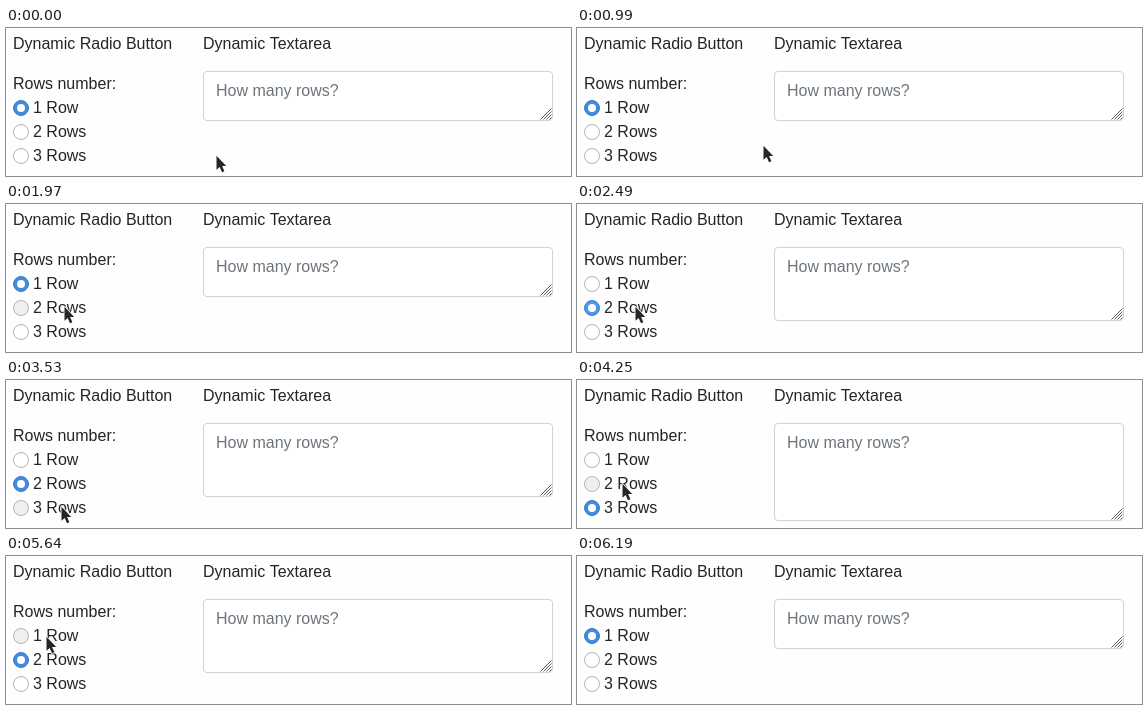
Recreate the animation shown at these times as an HTML page with a canvas. Size 565 by 148 pixels, loop 7100 ms.

```html
<!DOCTYPE html>
<html lang="en">
<head>
<meta charset="utf-8">
<title>Dynamic textarea rows</title>
<style>
  html, body { margin: 0; width: 100%; height: 100%; overflow: hidden; background: #fefefe; }
  canvas { display: block; }
</style>
</head>
<body>
<canvas id="stage" width="565" height="148"></canvas>
<script>
const LOOP = 7100;
const TICK = 135; // the pointer jumps about once per tick
const ctx = document.getElementById("stage").getContext("2d");
const arrow = new Path2D("M1.5 .8V14.8L4.7 11.9L7 17.2L9.4 16.2L7.1 11H11.2Z");

const home = { x: 209, y: 127 };
const moves = [
  { start: 990, end: 1540, x: 89, y: 77 },
  { start: 1690, end: 1820, x: 57, y: 102 },
  { start: 2920, end: 3160, x: 54, y: 126 },
  { start: 3980, end: 4250, x: 44, y: 103 },
  { start: 5100, end: 5360, x: 39, y: 80 },
  { start: 5940, end: 6190, x: 204, y: 157 }
];
const clicks = [{ at: 0, row: 1 }, { at: 2490, row: 2 }, { at: 3680, row: 3 },
                { at: 4670, row: 2 }, { at: 5790, row: 1 }];

function pointerAt(t) {
  let { x, y } = home;
  for (const m of moves) {
    if (t < m.start) break;
    const count = Math.round((m.end - m.start) / TICK);
    const jumps = Math.floor((t - m.start) / (m.end - m.start) * count + 1e-6) + 1;
    const p = Math.min(1, jumps / (count + 1));
    x += (m.x - x) * p;
    y += (m.y - y) * p;
  }
  return { x: Math.round(x), y: Math.round(y) };
}

function rowUnder({ x, y }) {
  return x < 72 ? Math.floor((y + 1 - 68) / 24) + 1 : 0;
}

function text(label, x, y, color = "#212529") {
  ctx.fillStyle = color;
  ctx.fillText(label, x, y);
}

function disc(y, r, fill, stroke) {
  ctx.beginPath();
  ctx.arc(15, y, r, 0, 2 * Math.PI);
  ctx.fillStyle = fill;
  ctx.fill();
  if (!stroke) return;
  ctx.strokeStyle = stroke;
  ctx.stroke();
}

function radio(row, on, over) {
  const y = 56 + 24 * row;
  if (on) {
    disc(y, 7.5, over ? "#4f97ed" : "#4289e0", "#377cd2");
    disc(y, 4, "#fff");
  } else {
    disc(y, 7.5, over ? "#efefef" : "#fff", "#b4b4b4");
  }
  text(`${row} Row${row > 1 ? "s" : ""}`, 27, y + 5);
}

function textarea(rows) {
  const height = 26 + 24 * rows, bottom = 43 + height;
  ctx.beginPath();
  ctx.roundRect(197.5, 43.5, 349, height - 1, 3.5);
  ctx.fillStyle = "#fff";
  ctx.fill();
  ctx.strokeStyle = "#ced4da";
  ctx.stroke();
  text("How many rows?", 210, 68, "#6c757d");

  ctx.beginPath();
  for (let d = 2; d <= 11; d += 3) {
    ctx.moveTo(545.5 - d, bottom - 1.5);
    ctx.lineTo(545.5, bottom - 1.5 - d);
  }
  ctx.strokeStyle = "#555";
  ctx.stroke();
}

function pointer({ x, y }) {
  ctx.save();
  ctx.translate(x, y);
  ctx.lineWidth = 1.6;
  ctx.lineJoin = "round";
  ctx.strokeStyle = "#fff";
  ctx.stroke(arrow);
  ctx.fillStyle = "#262626";
  ctx.fill(arrow);
  ctx.restore();
}

function draw(t) {
  const spot = pointerAt(t);
  const chosen = clicks.findLast(c => c.at <= t).row;
  ctx.font = '16px "Liberation Sans", Arial, sans-serif';
  ctx.fillStyle = "#fefefe";
  ctx.fillRect(0, 0, 565, 148);
  text("Dynamic Radio Button", 7, 21);
  text("Dynamic Textarea", 197, 21);
  text("Rows number:", 7, 61);
  for (let row = 1; row <= 3; row++) radio(row, row === chosen, row === rowUnder(spot));
  textarea(chosen);
  pointer(spot);
}

function tick() {
  draw(performance.now() % LOOP);
  requestAnimationFrame(tick);
}
tick();
</script>
</body>
</html>
```
